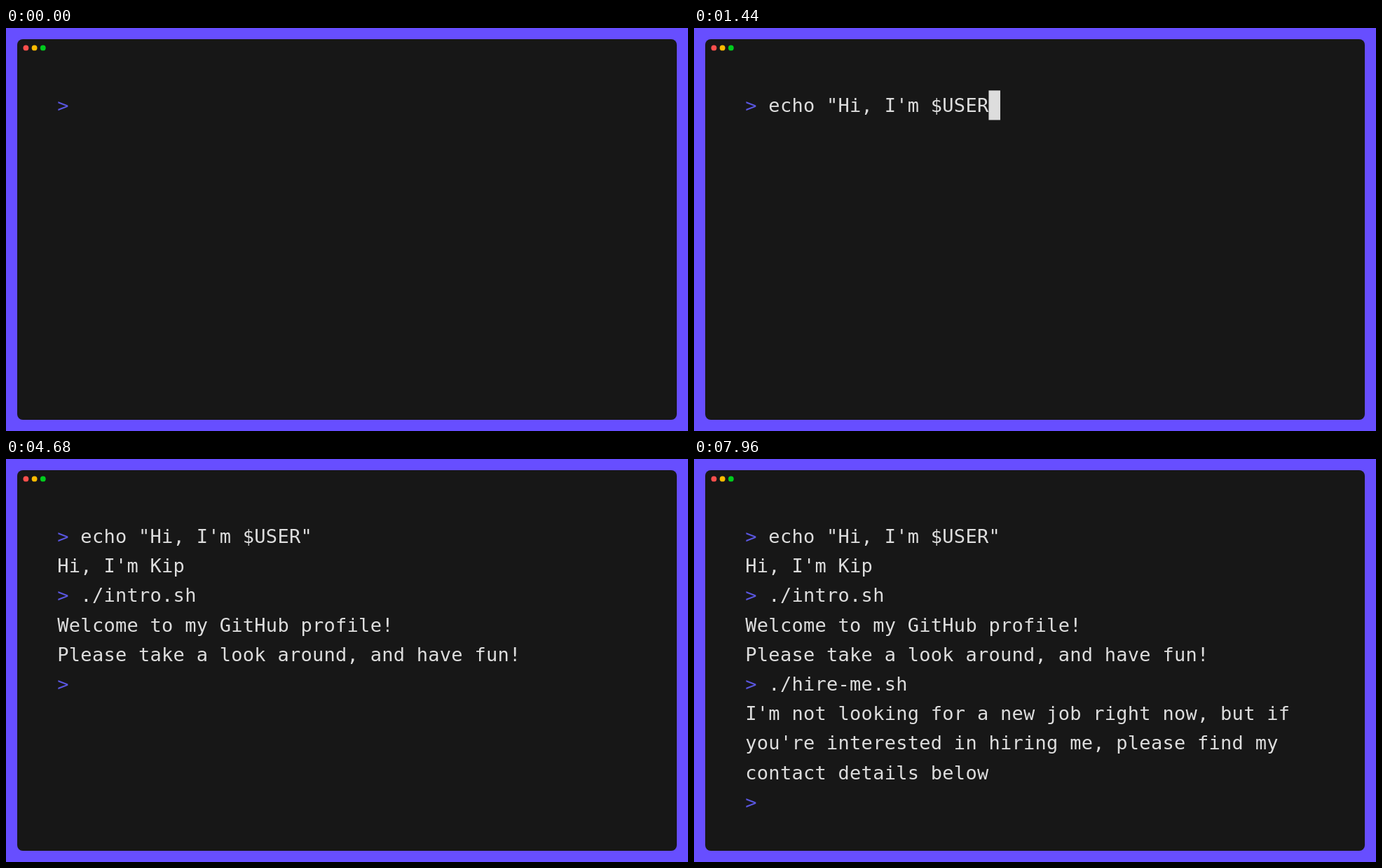
Write an HTML page that moves like this. It is 973 px wide and 576 px high and loops after 8 s.

```html
<!DOCTYPE html>
<html lang="en">
<head>
<meta charset="utf-8">
<title>Terminal intro</title>
<style>
  html, body { margin: 0; width: 100%; height: 100%; overflow: hidden; background: #674eff; }
  svg { display: block; }
  text {
    font: 27px "DejaVu Sans Mono", monospace;
    letter-spacing: .276px;
    white-space: pre;
    fill: #ddd;
  }
  .prompt { fill: #5a56e0; }
</style>
</head>
<body>
<svg width="973" height="576" viewBox="0 0 973 576">
  <rect x="16" y="16" width="941" height="544" rx="8" fill="#171717"/>
  <circle cx="28.4" cy="28.4" r="3.9" fill="#ff4f4d"/>
  <circle cx="40.6" cy="28.4" r="3.9" fill="#febb00"/>
  <circle cx="52.8" cy="28.4" r="3.9" fill="#00cc1d"/>
  <g id="screen"></g>
  <rect id="cursor" width="16.53" height="42.2" fill="#ddd"/>
</svg>
<script>
const LOOP = 8000, TICK = 40, KEY = 52, LEAD = 18;
const LEFT = 73.3, TOP = 89.3, CELL = 16.53, ROW = 42.2, BASELINE = 30.7;

// shown: prompt appears; type: first key; enter: output appears
const commands = [
  { shown: 0, type: 520, enter: 2040, input: 'echo "Hi, I\'m $USER"',
    output: ["Hi, I'm Kip"] },
  { shown: 2040, type: 3040, enter: 4080, input: './intro.sh',
    output: ['Welcome to my GitHub profile!', 'Please take a look around, and have fun!'] },
  { shown: 4080, type: 5080, enter: 6200, input: './hire-me.sh',
    output: ["I'm not looking for a new job right now, but if",
             "you're interested in hiring me, please find my",
             'contact details below'] },
  { shown: 6200, type: Infinity, enter: Infinity, input: '', output: [] }
];

// Spans of time in which the idle cursor is hidden
const blinks = [[0, 40], [2640, 3040], [4680, 5080], [6800, 7400], [7960, 8000]];

const screen = document.getElementById('screen');
const cursor = document.getElementById('cursor');

function addText(content, col, row, className = '') {
  const el = document.createElementNS('http://www.w3.org/2000/svg', 'text');
  el.setAttribute('x', LEFT + col * CELL);
  el.setAttribute('y', TOP + row * ROW + BASELINE);
  el.setAttribute('class', className);
  el.textContent = content;
  screen.append(el);
  return el;
}

let nextRow = 0;
for (const c of commands) {
  c.row = nextRow++;
  c.prompt = addText('>', 0, c.row, 'prompt');
  c.typed = addText('', 2, c.row);
  c.results = c.output.map(line => addText(line, 0, nextRow++));
}

const show = (el, on) => el.setAttribute('visibility', on ? 'visible' : 'hidden');

function keysTyped(c, t) {
  if (t < c.type) return 0;
  return Math.min(c.input.length, Math.floor((t - c.type + LEAD) / KEY) + 1);
}

function render(now) {
  const t = Math.floor(now % LOOP / TICK) * TICK;
  for (const c of commands) {
    const count = keysTyped(c, t);
    show(c.prompt, t >= c.shown);
    c.typed.textContent = c.input.slice(0, count);
    c.results.forEach(el => show(el, t >= c.enter));
    if (t >= c.shown && t < c.enter) {
      cursor.setAttribute('x', LEFT + (2 + count) * CELL);
      cursor.setAttribute('y', TOP + c.row * ROW);
    }
  }
  show(cursor, !blinks.some(([from, to]) => t >= from && t < to));
}

const start = performance.now();
function frame() {
  render(performance.now() - start);
  requestAnimationFrame(frame);
}
frame();
</script>
</body>
</html>
```
